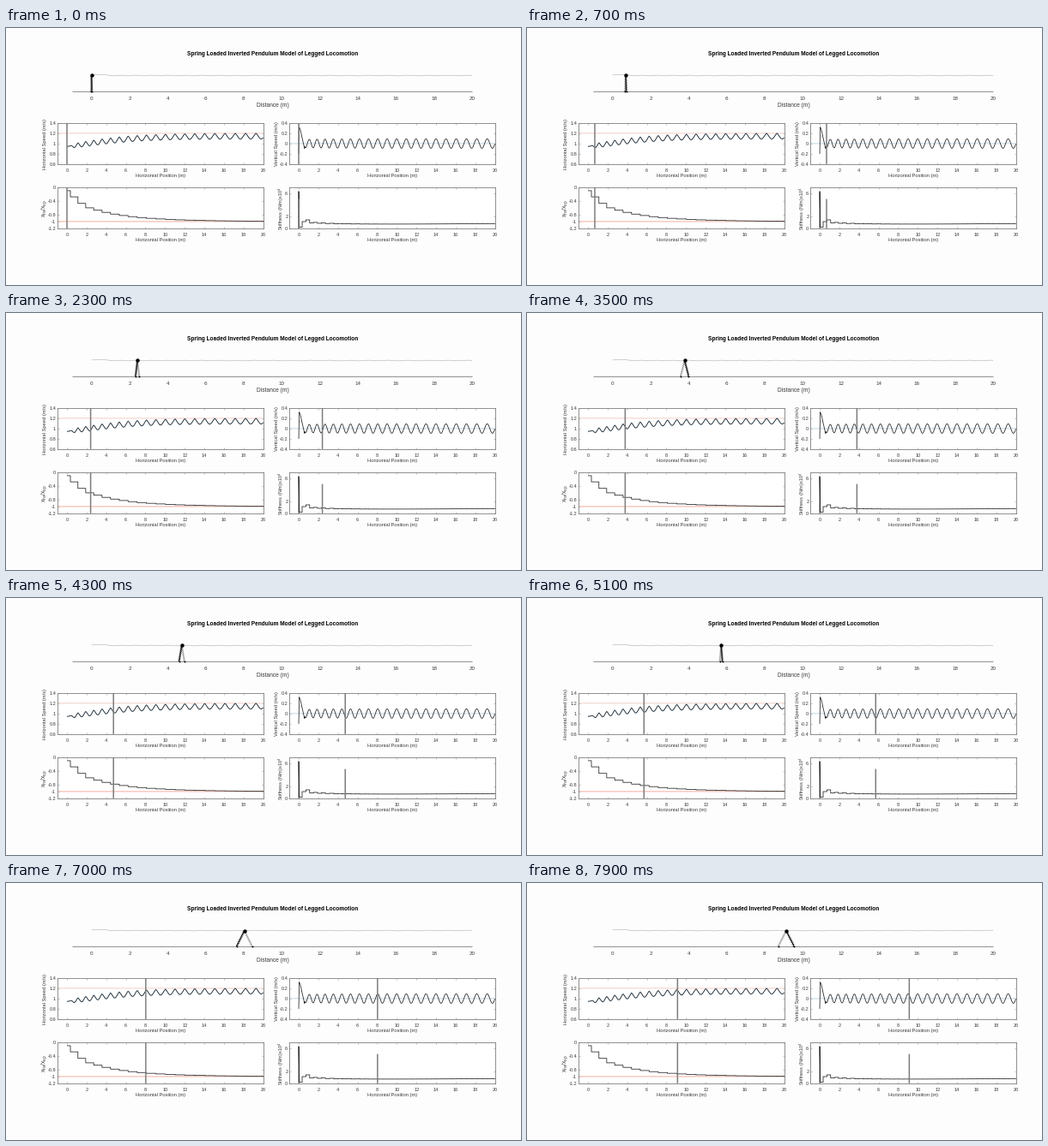
These frames come from a looping animation (600x300 px, 8000 ms). A matplotlib script:

```python
import numpy as np
import matplotlib.pyplot as plt
from matplotlib.animation import FuncAnimation

W, H, PT = 600, 300, 0.72          # stage in pixels, points per pixel at 100 dpi
FRAMES, STEP_MS = 80, 100
INK, EDGE = "#3a3a3a", "#858585"

plt.rcParams.update({
    "font.family": "Liberation Sans",
    "mathtext.fontset": "custom",
    "mathtext.rm": "Liberation Sans",
})

fig = plt.figure(figsize=(W / 100, H / 100), dpi=100, facecolor="#fdfdfd")


def label(x, y, s, size=5.75, **kw):
    opts = dict(ha="center", va="center", color=INK) | kw
    stage.text(x, y, s, fontsize=size * PT, **opts)


# ---- gait: body position where step n begins, and its inverse ----
def step_x(n):
    return 0.35 + 1.15 * n - 5.2 * (1 - np.exp(-n / 13))


_n = np.linspace(-0.5, 24, 2000)


def step_at(x):
    return np.interp(x, step_x(_n), _n)


def travel(t):
    return t * (0.965 + 0.0415 * t - 0.0022 * t * t)


# ---- plotted quantities ----
def h_speed(x, gain=1.0):
    mean = 1.145 - 0.2 * np.exp(-(x / 5.2) ** 1.3)
    amp = (0.053 - 0.02 * np.exp(-x / 2)) * np.clip((x - 0.25) / 0.5, 0, 1)
    cusp = 1 - 2 * np.abs(np.sin(np.pi * step_at(x))) ** 1.5
    return mean + gain * amp * cusp


def v_speed(x):
    amp = 0.092 - 0.015 * np.exp(-x / 3)
    wave = amp * np.cos(2 * np.pi * (step_at(x) + 0.05))
    start = np.interp(x, [0, 0.05, 0.15, 0.6], [-0.2, 0.32, 0.28, -0.1])
    return np.where(x < 0.6, start, wave)


def body_y(x):
    hump = -1.2 * np.exp(-((x - 0.4) / 0.4) ** 2)
    return 55.5 + hump + 0.3 * np.sin(2 * np.pi * step_at(x) + 1.6)


def ratio_steps():
    k = np.arange(23)
    head = np.array([0.9, 0.72, 0.53, 0.4])
    gap = np.where(k < 4, head[np.minimum(k, 3)], 0.33 * 0.81 ** (k - 4.0))
    return np.r_[0, step_x(k[:-1])], gap - 1


def stiffness_steps():
    j = np.arange(46)
    base = 0.67 + 0.5 * np.exp(-j / 7) + 0.13 * (j / 40) ** 2
    level = base + 0.15 * np.exp(-j / 5) * (-1.0) ** j
    level[:3] = 0.2, 1.15, 1.45
    return np.r_[0.06, step_x(j[:-1] / 2)], level


# ---- static drawing ----
def panel(x, y, ylim, ticks, name, name_x, name_size=5.75):
    w, h = 240, 48
    x0, base = x - 0.4, y + h - 0.1
    ax = fig.add_axes([x0 / W, 1 - base / H, w / W, h / H])
    ax.set(xlim=(-1, 20), ylim=ylim, xticks=range(0, 21, 2), yticks=ticks)
    ax.tick_params(direction="in", length=2 * PT, width=0.5 * PT, color=EDGE,
                   top=True, right=True, labelbottom=False, labelleft=False)
    for side in ax.spines.values():
        side.set(linewidth=0.9 * PT, color=EDGE)
    for v in range(0, 21, 2):
        label(x0 + (v + 1) * w / 21, base + 7.2, str(v), 5.5)
    for v in ticks:
        ty = base - h * (v - ylim[0]) / (ylim[1] - ylim[0])
        label(x - 1.8, ty + 0.3, f"{v:g}", 5.5, ha="right")
    label(x + w / 2, base + 13.5, "Horizontal Position (m)")
    label(name_x, y + h / 2 + 0.5, name, name_size, rotation=90)
    return ax


def trace(ax, x, y, color="#262626", width=0.8, **kw):
    opts = dict(snap=False, solid_capstyle="butt") | kw
    return ax.plot(x, y, color=color, lw=width * PT, **opts)[0]


def track(x):
    return 99.6 + 22.17 * x


stage = fig.add_axes([0, 0, 1, 1], zorder=5)
stage.set(xlim=(0, W), ylim=(H, 0))
stage.axis("off")
stage.patch.set_visible(False)

label(310.5, 30.8, "Spring Loaded Inverted Pendulum Model of Legged Locomotion",
      6.55, weight="bold", color="black")
label(310.5, 90.3, "Distance (m)", 6.6)

GROUND = 74.4
trace(stage, [77.5, 543.5], [GROUND] * 2, EDGE, 0.9)
for v in range(0, 21, 2):
    label(track(v), 82.3, str(v), 6.3)

xs = np.linspace(0, 20, 2400)
trace(stage, track(xs), body_y(xs), "#c4c4c4", 0.8)

ax_h = panel(60, 111, (0.6, 1.4), [0.6, 0.8, 1, 1.2, 1.4],
             "Horizontal Speed (m/s)", 46)
ax_v = panel(330, 111, (-0.4, 0.4), [-0.4, -0.2, 0, 0.2, 0.4],
             "Vertical Speed (m/s)", 315)
ax_r = panel(60, 186, (-1.2, 0), [-1.2, -1, -0.8, -0.4, 0],
             r"$\mathrm{x_{hs}/x_{sp}}$", 45, 6.8)
ax_k = panel(330, 186, (0, 7), [0, 2, 6],
             r"Stiffness (N/m)x10$^\mathrm{4}$", 320.5, 5.6)

trace(ax_h, [-1, 20], [1.2, 1.2], "#f3c3b8", 0.8)
trace(ax_h, xs, h_speed(xs, 1.15), "#9cc3e0", 0.8)
trace(ax_h, xs, h_speed(xs))
trace(ax_v, [-1, 20], [0, 0], "#b4cfda", 0.8)
trace(ax_v, xs, v_speed(xs))

trace(ax_r, [-1, 20], [-1, -1], "#f5a595", 0.9)
trace(ax_r, *ratio_steps(), drawstyle="steps-post")
trace(ax_k, [0, 0, 0.06], [0, 6.3, 0.2])
trace(ax_k, *stiffness_steps(), drawstyle="steps-post")

# ---- moving parts ----
spans = [(ax_h, 0.6, 1.4), (ax_v, -0.4, 0.4), (ax_r, -1.2, 0), (ax_k, 0, 5)]
cursors = [trace(ax, [0, 0], [lo, hi], "#7c7c7c", 1.5, zorder=4)
           for ax, lo, hi in spans]
legs = [trace(stage, [], [], "#8f8f8f", 0.7, zorder=5),
        trace(stage, [], [], "#111111", 0.9, zorder=6)]
feet = stage.plot([], [], "o", color="black", ms=2 * PT, mew=0, zorder=7)[0]
body = stage.plot([], [], "o", color="black", ms=4.4 * PT, mew=0, zorder=8)[0]


def spring(x0, y0, x1, y1, coils=9, amp=0.9):
    s = np.linspace(0, 1, 2 * coils + 2)
    side = amp * (-1.0) ** np.arange(s.size)
    side[[0, -1]] = 0
    dx, dy = x1 - x0, y1 - y0
    size = np.hypot(dx, dy)
    return x0 + s * dx - side * dy / size, y0 + s * dy + side * dx / size


def draw(i):
    x = travel(i * STEP_MS / 1000)
    step = int(np.floor(step_at(x)))
    hold = step_x(step + 0.5)
    bx, by = track(x), body_y(x)
    # the swing leg mirrors the stance leg; the two trade roles every step
    ends = [track(hold), track(2 * x - hold)]
    if step % 2:
        light, dark = ends
    else:
        dark, light = ends
    for line in cursors:
        line.set_xdata([x, x])
    for leg, foot in zip(legs, (light, dark)):
        leg.set_data(*spring(bx, by, foot, GROUND - 0.5))
    feet.set_data(ends, [GROUND - 0.7] * 2)
    body.set_data([bx], [by])
    return [*cursors, *legs, feet, body]


anim = FuncAnimation(fig, draw, frames=FRAMES, interval=STEP_MS,
                     repeat=True, repeat_delay=0, blit=False)
plt.show()
```
